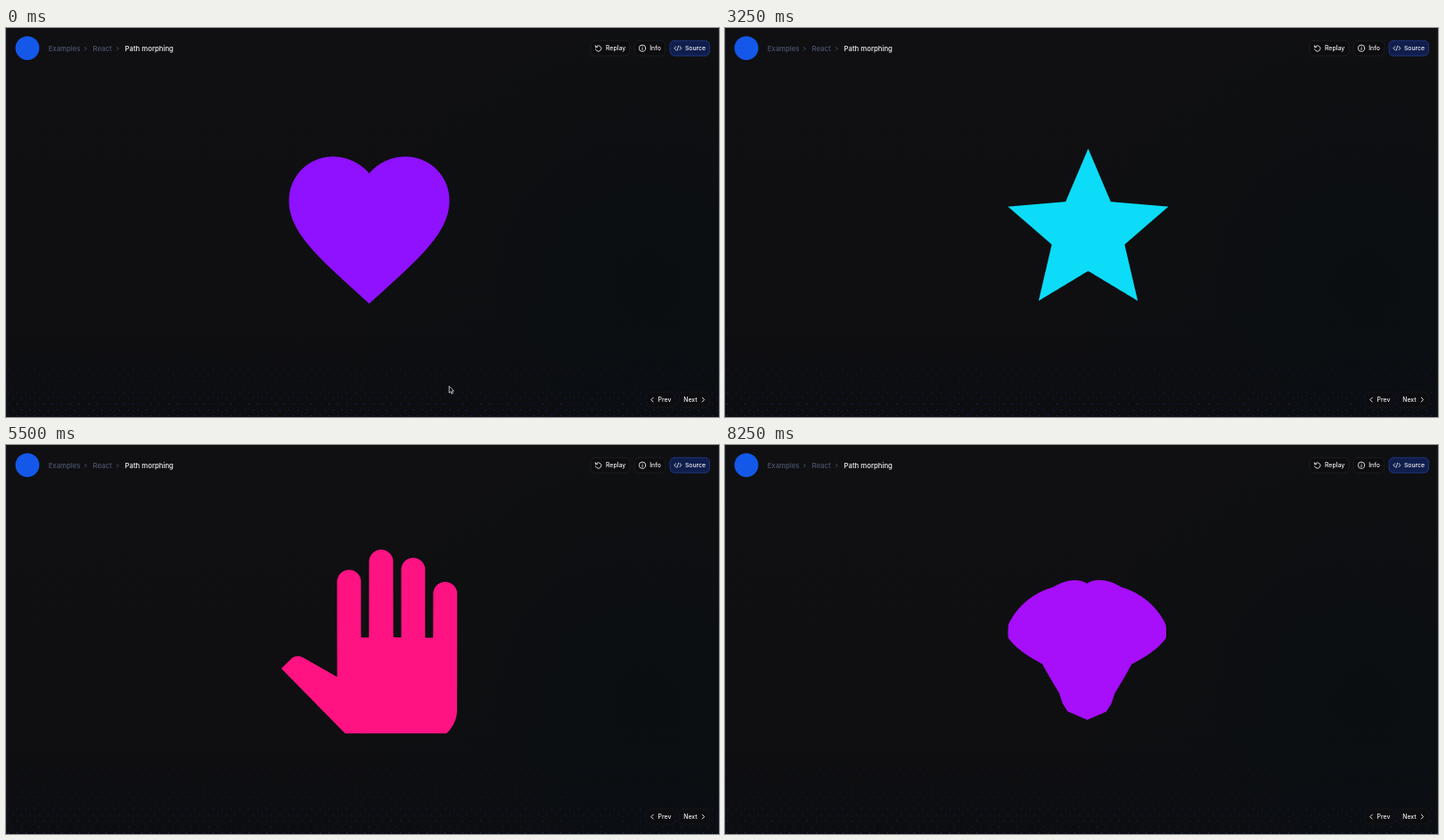
Recreate the animation shown at these times as an HTML page with a canvas. Size 800 px wide and 437 px high, loop 8300 ms.

```html
<!DOCTYPE html>
<html lang="en">
<head>
<meta charset="utf-8">
<title>Path morphing</title>
<style>
  html, body { margin: 0; width: 100%; height: 100%; overflow: hidden; background: #0f0f11; }
  canvas { display: block; width: 800px; height: 437px; }
</style>
</head>
<body>
<canvas id="stage"></canvas>
<script>
const W = 800, H = 437, LOOP = 8300;
const FIRST = 240, PERIOD = 1500, MORPH = 800, CURSOR_UNTIL = 400;
const SCALE = 9, LEFT = 299.5, TOP = 117.5, CLIP_Y = 324;
const MAX_SEG = 0.1;
const dpr = window.devicePixelRatio || 1;

// Polygons are corner lists; curved outlines are path strings.
const bolt = [[7, 2], [7, 13], [10, 13], [10, 22], [17, 10], [13, 10], [17, 2]];
const star = [[12, 17.27], [18.18, 21], [16.54, 13.97], [22, 9.24], [14.81, 8.63],
  [12, 2], [9.19, 8.63], [2, 9.24], [7.46, 13.97], [5.82, 21]];
const hand = "M23 5.5V20c0 2.2-1.8 4-4 4h-7.3c-1.08 0-2.1-.43-2.85-1.19L1 14.83s1.26-1.23 1.3-1.25c.22-.19.49-.29.79-.29.22 0 .42.06.6.16.04.01 4.31 2.46 4.31 2.46V4c0-.83.67-1.5 1.5-1.5S11 3.17 11 4v7h1V1.5c0-.83.67-1.5 1.5-1.5S15 .67 15 1.5V11h1V2.5c0-.83.67-1.5 1.5-1.5s1.5.67 1.5 1.5V11h1V5.5c0-.83.67-1.5 1.5-1.5s1.5.67 1.5 1.5z";
const plane = "M21 16v-2l-8-5V3.5c0-.83-.67-1.5-1.5-1.5S10 2.67 10 3.5V9l-8 5v2l8-2.5V19l-2 1.5V22l3.5-1 3.5 1v-1.5L13 19v-5.5l8 2.5z";
const heart = "M12 21.35l-1.45-1.32C5.4 15.36 2 12.28 2 8.5 2 5.42 4.42 3 7.5 3c1.74 0 3.41.81 4.5 2.09C13.09 3.81 14.76 3 16.5 3 19.58 3 22 5.42 22 8.5c0 3.78-3.4 6.86-8.55 11.54L12 21.35z";
const note = "M12 3v10.55c-.59-.34-1.27-.55-2-.55-2.21 0-4 1.79-4 4s1.79 4 4 4 4-1.79 4-4V7h4V3h-6z";

const PURPLE = [143, 17, 255], BLUE = [13, 99, 248], CYAN = [12, 220, 247], GREEN = [70, 240, 178],
  YELLOW = [255, 240, 24], PINK = [255, 8, 130], MAGENTA = [217, 0, 233];

const dist = (a, b) => Math.hypot(a[0] - b[0], a[1] - b[1]);
const along = (a, b, p) => [a[0] + (b[0] - a[0]) * p, a[1] + (b[1] - a[1]) * p];
const next = (ring, i) => ring[(i + 1) % ring.length];

function bisect(ring) {
  for (let i = 0; i < ring.length; i++) {
    let b = next(ring, i);
    while (dist(ring[i], b) > MAX_SEG) {
      b = along(ring[i], b, 0.5);
      ring.splice(i + 1, 0, b);
    }
  }
}

function samplePath(d) {
  const path = document.createElementNS("http://www.w3.org/2000/svg", "path");
  path.setAttribute("d", d);
  const len = path.getTotalLength(), n = Math.ceil(len / MAX_SEG);
  return Array.from({ length: n }, (_, i) => {
    const p = path.getPointAtLength(len * i / n);
    return [p.x, p.y];
  });
}

function toRing(shape) {
  const exact = Array.isArray(shape);
  const ring = exact ? shape.slice() : samplePath(shape);
  const area = ring.reduce((sum, a, i) => {
    const b = next(ring, i);
    return sum + a[1] * b[0] - a[0] * b[1];
  }, 0);
  if (area > 0) ring.reverse();
  if (exact) bisect(ring);
  return ring;
}

// Spread extra points evenly along the outline.
function addPoints(ring, count) {
  if (count <= 0) return;
  const target = ring.length + count;
  const step = ring.reduce((sum, a, i) => sum + dist(a, next(ring, i)), 0) / count;
  let i = 0, cursor = 0, at = step / 2;
  while (ring.length < target) {
    const a = ring[i % ring.length], b = next(ring, i), seg = dist(a, b);
    if (at <= cursor + seg) {
      ring.splice(i + 1, 0, seg ? along(a, b, (at - cursor) / seg) : a.slice());
      at += step;
    } else {
      cursor += seg;
      i++;
    }
  }
}

// Rotate a ring's start so that its points travel the least.
function align(ring, other) {
  const n = ring.length;
  let best = 0, min = Infinity;
  for (let off = 0; off < n; off++) {
    let sum = 0;
    for (let i = 0; i < n && sum < min; i++) {
      const a = ring[(off + i) % n], b = other[i];
      const dx = a[0] - b[0], dy = a[1] - b[1];
      sum += dx * dx + dy * dy;
    }
    if (sum < min) { min = sum; best = off; }
  }
  return ring.slice(best).concat(ring.slice(0, best));
}

function morph(from, to, colorA, colorB) {
  const a = toRing(from), b = toRing(to), diff = a.length - b.length;
  addPoints(a, -diff);
  addPoints(b, diff);
  return { a: align(a, b), b, colorA, colorB };
}

const morphs = [
  morph(heart, note, PURPLE, BLUE),
  morph(note, star, BLUE, CYAN),
  morph(star, bolt, CYAN, GREEN),
  morph(bolt, hand, YELLOW, PINK),
  morph(hand, plane, PINK, MAGENTA),
  morph(plane, heart, MAGENTA, PURPLE)
];

// cubic-bezier(.42, 0, .58, 1)
function easeInOut(x) {
  if (x <= 0) return 0;
  if (x >= 1) return 1;
  let lo = 0, hi = 1;
  for (let i = 0; i < 24; i++) {
    const u = (lo + hi) / 2, v = 1 - u;
    if (3 * v * v * u * 0.42 + 3 * v * u * u * 0.58 + u * u * u < x) lo = u; else hi = u;
  }
  return lo * lo * (3 - 2 * lo);
}

const mixColor = (a, b, p) =>
  `rgb(${a.map((v, i) => Math.round(Math.sqrt(v * v * (1 - p) + b[i] * b[i] * p)))})`;

function makeLayer(canvas) {
  canvas.width = W * dpr;
  canvas.height = H * dpr;
  const c = canvas.getContext("2d");
  c.scale(dpr, dpr);
  return c;
}

function drawBackground(c) {
  const base = c.createLinearGradient(0, 0, 0, H);
  base.addColorStop(0, "#101012");
  base.addColorStop(0.7, "#0f0f11");
  base.addColorStop(1, "#0c0d11");
  c.fillStyle = base;
  c.fillRect(0, 0, W, H);
  const tint = c.createRadialGradient(720, 290, 20, 720, 290, 330);
  tint.addColorStop(0, "rgba(9,14,18,.8)");
  tint.addColorStop(1, "rgba(9,14,18,0)");
  c.fillStyle = tint;
  c.fillRect(0, 0, W, H);

  for (let row = 0; row < 19; row++) {
    const y = 318 + row * 6.5, k = (row + 1) / 19;
    c.fillStyle = `rgba(36,44,165,${0.12 + 0.68 * k * k})`;
    for (let x = row % 2 ? 7 : 2; x < W; x += 10) c.fillRect(x, y, 1, 1);
  }
  c.fillStyle = "rgba(70,80,115,.3)";
  c.fillRect(0, 0, 0.7, H);
  c.fillRect(W - 0.6, 0, 0.6, H);
}

function drawChrome(c) {
  const text = (s, x, y, size, color, weight = 500) => {
    c.font = `${weight} ${size}px Inter, sans-serif`;
    c.fillStyle = color;
    c.fillText(s, x, y);
  };
  const line = (points, color, width = 1) => {
    c.beginPath();
    points.forEach(([x, y]) => c.lineTo(x, y));
    c.strokeStyle = color;
    c.lineWidth = width;
    c.stroke();
  };
  const arc = (x, y, r, from, to) => {
    c.beginPath();
    c.arc(x, y, r, from, to);
    c.strokeStyle = "#f2f2f4";
    c.lineWidth = 0.85;
    c.stroke();
  };
  const chevron = (x, y, dx, dy, color, width) =>
    line([[x - dx, y - dy], [x + dx, y], [x - dx, y + dy]], color, width);
  const button = (x, y, w, fill, border) => {
    c.beginPath();
    c.roundRect(x, y, w, 17, 5);
    c.fillStyle = fill;
    c.fill();
    c.strokeStyle = border;
    c.lineWidth = 0.8;
    c.stroke();
  };
  const white = "#f2f2f4", muted = "#4b5570";
  c.lineCap = c.lineJoin = "round";

  c.beginPath();
  c.arc(24, 22.6, 13.4, 0, Math.PI * 2);
  c.fillStyle = "#1458ea";
  c.fill();

  text("Examples", 47.7, 25.7, 7.75, muted);
  chevron(89.3, 23.2, 0.9, 1.8, muted, 0.9);
  text("React", 97.5, 25.7, 7.75, muted);
  chevron(125.4, 23.2, 0.9, 1.8, muted, 0.9);
  text("Path morphing", 133.6, 25.7, 7.75, white);

  const dark = "#0d0d0f", edge = "#202126";
  button(656, 14.2, 44, dark, edge);
  arc(664.7, 23, 3.2, -2.5, 2.9);
  line([[661.3, 19.6], [661.5, 21.6], [663.5, 21.6]], white, 0.85);
  text("Replay", 673, 25.2, 6.9, white);

  button(705.2, 14.2, 34.6, dark, edge);
  arc(714, 22.7, 3.7, 0, Math.PI * 2);
  line([[714, 22.5], [714, 24.5]], white, 0.85);
  line([[714, 20.8], [714, 20.9]], white, 0.85);
  text("Info", 722.2, 25.2, 6.9, white);

  button(745, 14.2, 44.4, "#101e4d", "#234190");
  chevron(756.9, 22.7, 0.9, 1.9, white, 0.85);
  chevron(750.8, 22.7, -0.9, 1.9, white, 0.85);
  line([[754.7, 20], [753, 25.3]], white, 0.8);
  text("Source", 761.9, 25.2, 6.85, white);

  button(718, 409, 33, dark, "#17181c");
  chevron(725, 417.6, -1.2, 2.4, white, 0.95);
  text("Prev", 731.6, 420, 6.9, white);
  button(755, 409, 34.2, dark, "#17181c");
  text("Next", 760.2, 420, 6.9, white);
  chevron(782.4, 417.6, 1.2, 2.4, white, 0.95);
}

function drawCursor(c) {
  c.beginPath();
  [[0, 0], [0, 7.6], [1.7, 6.1], [2.9, 8.7], [4.2, 8.1], [3.1, 5.6], [5.3, 5.5]]
    .forEach(([x, y]) => c.lineTo(497.2 + x, 402.3 + y));
  c.closePath();
  c.fillStyle = "#08080a";
  c.fill();
  c.strokeStyle = "#e4e4e6";
  c.lineWidth = 0.8;
  c.stroke();
}

const backdrop = document.createElement("canvas");
const back = makeLayer(backdrop);
drawBackground(back);
drawChrome(back);
const ctx = makeLayer(document.getElementById("stage"));

function drawShape(t) {
  let index = Math.max(0, Math.floor((t - FIRST) / PERIOD));
  let x = (t - FIRST - index * PERIOD) / MORPH;
  // The bolt restarts the cycle in its opening colour as soon as it is formed.
  if (index === 2 && x >= 1) { index = 3; x = 0; }
  const m = morphs[index], p = easeInOut(x);
  ctx.save();
  ctx.beginPath();
  ctx.rect(0, 0, W, CLIP_Y);
  ctx.clip();
  ctx.beginPath();
  m.a.forEach((a, i) => {
    const q = along(a, m.b[i], p);
    ctx.lineTo(LEFT + q[0] * SCALE, TOP + q[1] * SCALE);
  });
  ctx.closePath();
  ctx.fillStyle = mixColor(m.colorA, m.colorB, p);
  ctx.fill();
  ctx.restore();
}

let start;
function frame(now) {
  if (start === undefined) start = now;
  const t = (now - start) % LOOP;
  ctx.drawImage(backdrop, 0, 0, W, H);
  drawShape(t);
  if (t < CURSOR_UNTIL) drawCursor(ctx);
  requestAnimationFrame(frame);
}
requestAnimationFrame(frame);
</script>
</body>
</html>
```
